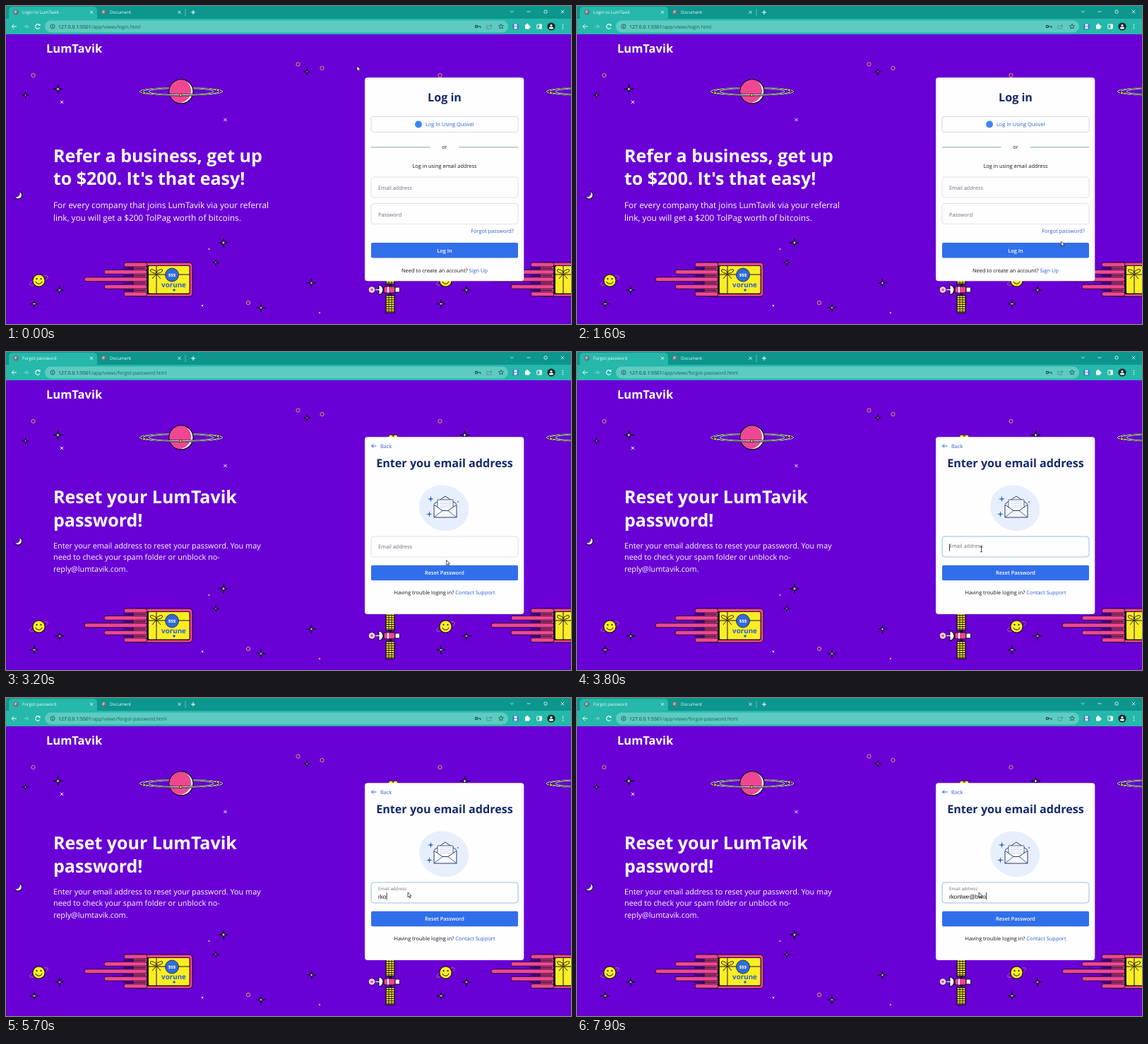
These frames come from a looping animation (800 by 450 pixels, 8000 ms). An HTML page with a canvas:

```html
<!DOCTYPE html>
<html lang="en">
<head>
<meta charset="utf-8">
<title>Login demo</title>
<style>
html, body { margin: 0; width: 100%; height: 100%; overflow: hidden; background: #6900d6; }
canvas, svg { position: absolute; left: 0; top: 0; width: 800px; height: 450px; }
text { font: 400 7.4px "Open Sans", "Noto Sans", sans-serif; fill: #15151c; white-space: pre; text-rendering: geometricPrecision; }
.bar { font-size: 6.2px; fill: #eefffc; }
.url { font-size: 6.9px; fill: #0d3f3b; }
.url tspan { fill: #16625b; }
.brand { font-size: 16.5px; font-weight: 700; fill: #fff; }
.big { font-size: 25px; font-weight: 700; fill: #fff; }
.lead { font-size: 11.85px; fill: #fff; }
.note { font-size: 10.83px; fill: #fff; }
.title { font-size: 16.15px; font-weight: 700; fill: #142a6c; }
.link { fill: #2f62d2; }
.hint { fill: #6d6d78; }
.btn { font-weight: 600; fill: #fff; }
.typed { font: 8.25px "Liberation Sans", Arial, sans-serif; }
.price { font-size: 6.2px; font-weight: 700; fill: #fff; }
.print { font-size: 9.8px; font-weight: 700; fill: #2c5fd0; }
.mid { text-anchor: middle; }
.end { text-anchor: end; }
</style>
</head>
<body>
<canvas id="scene" width="800" height="450"></canvas>
<svg viewBox="0 0 800 450">
  <text class="bar" id="tab" x="23" y="11"></text>
  <text class="bar" x="147" y="11">Document</text>
  <text class="url" x="74" y="31.5">127.0.0.1:5501<tspan id="path"></tspan></text>
  <text class="brand" x="57" y="66">LumTavik</text>
  <text class="price mid" x="235" y="382.6">$$$</text>
  <text class="print mid" x="237.5" y="398">vorune</text>

  <g id="login">
    <text class="big" x="67" y="221">Refer a business, get up</text>
    <text class="big" x="67" y="253">to $200. It's that easy!</text>
    <text class="lead" x="67" y="286">For every company that joins LumTavik via your referral</text>
    <text class="lead" x="67" y="304">link, you will get a $200 TolPag worth of bitcoins.</text>
    <text class="title mid" x="621" y="135">Log in</text>
    <text class="link" x="594" y="170.3">Log In Using Quovel</text>
    <text class="mid" x="621" y="202.2">or</text>
    <text class="mid" x="621" y="228.6">Log in using email address</text>
    <text class="hint" x="527" y="260">Email address</text>
    <text class="hint" x="527" y="297.5">Password</text>
    <text class="link end" x="719" y="320.5">Forgot password?</text>
    <text class="btn mid" x="621" y="348.6">Log In</text>
    <text class="mid" x="621" y="376.5">Need to create an account? <tspan class="link">Sign Up</tspan></text>
  </g>

  <g id="reset">
    <text class="big" x="67" y="214">Reset your LumTavik</text>
    <text class="big" x="67" y="246.5">password!</text>
    <text class="note" x="67" y="278">Enter your email address to reset your password. You may</text>
    <text class="note" x="67" y="294.3">need to check your spam folder or unblock no-</text>
    <text class="note" x="67" y="310.6">reply@lumtavik.com.</text>
    <text class="link" x="530" y="136">Back</text>
    <text class="title mid" x="621" y="163">Enter you email address</text>
    <text class="hint" id="label" x="527" y="278">Email address</text>
    <text class="typed" id="typed" x="527" y="283.5"></text>
    <rect id="caret" width="0.8" height="10" fill="#111"></rect>
    <text class="btn mid" x="621" y="315.3">Reset Password</text>
    <text class="mid" x="621" y="343">Having trouble loging in? <tspan class="link">Contact Support</tspan></text>
  </g>
</svg>
<canvas id="top" width="800" height="450"></canvas>
<script>
const LOOP = 8000, LOAD = 2100, READY = 2700, FOCUS = 3775, TILE = 576, TAU = 2 * Math.PI;
const PURPLE = '#6900d6', PINK = '#ef4792', YELLOW = '#fbee23', INK = '#140a20';
const BLUE = '#316fea', LINK = '#2f62d2', TEAL = '#25b8ab', PALE = '#effffc', DARK = '#14524d', PAPER = '#fefdff';
const el = id => document.getElementById(id);
const scene = el('scene').getContext('2d'), overlay = el('top').getContext('2d');
let c = scene;

const clamp = v => Math.max(0, Math.min(1, v));
const ease = v => v * v * (3 - 2 * v);

function paint(fill, stroke, w = 1) {
  if (fill) { c.fillStyle = fill; c.fill(); }
  if (stroke) { c.strokeStyle = stroke; c.lineWidth = w; c.stroke(); }
}
function box(x, y, w, h, r, fill, stroke, lw) {
  c.beginPath(); c.roundRect(x, y, w, h, r); paint(fill, stroke, lw);
}
function oval(x, y, rx, ry, fill, stroke, lw, rot = 0, a = 0, b = TAU) {
  c.beginPath(); c.ellipse(x, y, rx, ry, rot, a, b); paint(fill, stroke, lw);
}
const disc = (x, y, r, fill, stroke, lw) => oval(x, y, r, r, fill, stroke, lw);
function polar(x, y, radius, n, fill, stroke, lw) {
  c.beginPath();
  for (let i = 0; i < n; i++) {
    const a = i / n * TAU, r = radius(a, i);
    c.lineTo(x + r * Math.cos(a), y + r * Math.sin(a));
  }
  c.closePath();
  paint(fill, stroke, lw);
}
function line(col, lw, ...pts) {
  c.beginPath();
  for (let i = 0; i < pts.length; i += 2) c.lineTo(pts[i], pts[i + 1]);
  paint(null, col, lw);
}
function cross(x, y, r, col, lw) {
  line(col, lw, x - r, y - r, x + r, y + r);
  line(col, lw, x - r, y + r, x + r, y - r);
}
// dir is -1 for left, 1 for right
function arrow(x, y, w, h, dir, col) {
  line(col, 1, x - dir * w, y, x, y);
  line(col, 1, x - dir * h, y - h, x, y, x - dir * h, y + h);
}
// four-pointed star with sunken sides
const spark = (x, y, r, fill, stroke) =>
  polar(x, y, (a, i) => i % 2 ? r * 0.27 : r, 8, fill, stroke, 1.2);

function planet() {
  const x = 248, y = 121, rings = [59, 54, 46];
  const arcs = from => rings.forEach(r => {
    oval(x, y, r, r / 10, null, INK, 1.8, 0, from, from + Math.PI);
    oval(x, y, r, r / 10, null, '#f4e9ff', 0.9, 0, from, from + Math.PI);
  });
  arcs(Math.PI);
  disc(x, y, 17, '#fff', INK, 1.4);
  c.save();
  c.beginPath(); c.arc(x, y, 16.4, 0, TAU); c.clip();
  disc(x - 3, y - 1, 17, PINK);
  c.restore();
  arcs(0);
  for (const a of [2.7, 1.58, -0.45])
    disc(x + 58 * Math.cos(a), y + 5 * Math.sin(a), 1.8, YELLOW, INK, 0.8);
}

function gift() {
  box(180, 363, 84, 48, 5, PINK, INK, 1);
  for (let i = 0; i < 5; i++) {
    const x = 111 + 28 * Math.abs(i - 2), y = 363 + i * 10.4;
    box(x, y, 200 - x, 6, 3, PINK, INK, 0.9);
    if (i) line(INK, 1.2, 166, y - 2.2, 198, y - 2.2);
  }
  box(199, 367, 61.5, 41, 2, INK);
  box(201.5, 367.5, 58.5, 39.5, 2, YELLOW, INK, 0.9);
  line(INK, 1, 213, 368, 213, 407);
  line(INK, 1, 202, 380, 260, 380);
  for (const s of [-1, 1]) {
    oval(213 + s * 4.5, 375.5, 4.6, 2.1, YELLOW, INK, 0.9, -s * 0.45);
    line(INK, 0.9, 213, 379, 213 + s * 6, 386);
  }
  disc(235, 380.5, 9.5, '#2f6bdd', INK, 0.7);
  disc(238, 402, 1.8, '#2c5fd0');
}

function smiley() {
  const x = 46.5, y = 388.5, ring = from => oval(x, y, 14, 4, null, '#d9748a', 0.8, -0.42, from, from + 1.7);
  disc(x, y, 8.7, YELLOW, INK, 1.2);
  ring(-0.85); ring(Math.PI - 0.85);
  for (const s of [-3, 3]) disc(x + s, y - 2.5, 1.1, INK);
  oval(x, y + 0.5, 4.6, 4.2, null, INK, 1, 0, 0.2, 2.9);
}

function moon() {
  disc(17, 267.5, 5.6, '#fff', INK, 1.2);
  oval(14, 265, 6, 5.8, PURPLE);
}

function panel(x, y, w, h) {
  box(x, y, w, h, 0, YELLOW, INK, 1.3);
  for (let k = 3.2; k < h; k += 3.2) line(INK, 1, x, y + k, x + w, y + k);
  for (let k = 1; k < 3; k++) line(INK, 0.8, x + k * w / 3, y, x + k * w / 3, y + h);
}
function satellite() {
  const y = 401.5;
  for (const x of [545, 551.5]) disc(x, 120.5, 3.5, YELLOW, INK, 0.8);
  for (const dy of [-32, 8]) panel(538, y + dy, 12, 24.5);
  box(543, y - 8, 3, 16, 0, INK);
  box(535, y - 4.5, 16, 9, 2, PINK, INK, 1.2);
  box(551, y - 3.5, 6.5, 7, 1, '#fff', INK);
  box(540, y - 4, 2, 8, 0, '#fff');
  c.beginPath(); c.arc(527, y, 7, -1.45, 1.45); c.closePath(); paint('#fff', INK, 1.2);
  line('#fff', 1.2, 520, y, 529, y);
  disc(518, y, 4.8, '#f6d3ea', INK, 0.8);
  disc(518, y, 1.8, PINK);
}

function sky() {
  for (const [x, y] of [[38.5, 98], [413.5, 82.5], [447.5, 88], [343, 420]]) disc(x, y, 2.6, null, '#eda04a', 1);
  for (const [x, y] of [[287.5, 344], [444, 434]]) disc(x, y, 1.2, '#f0a23c');
  for (const [x, y] of [[73.5, 117.5], [308, 335], [426, 93], [297, 363], [27.5, 126]]) {
    const r = x === 73.5 || x === 308 ? 5.5 : 3.3;
    spark(x, y, r, INK, INK);
    spark(x, y, r * 0.55, '#fff');
  }
  for (const [x, y] of [[76, 402], [40, 421.5], [432.5, 392], [361, 427]]) spark(x, y, 4.8, '#fff', INK);
  for (const [x, y] of [[79, 136], [310.5, 161], [278, 424]]) cross(x, y, y > 400 ? 1.2 : 2.1, '#fff', 1);
}

function backdrop() {
  c.fillStyle = PURPLE;
  c.fillRect(0, 0, 800, 450);
  for (const dx of [0, TILE]) {
    c.save();
    c.translate(dx, 0);
    for (const draw of [sky, planet, gift, smiley, moon, satellite]) draw();
    c.restore();
  }
}

function tabs() {
  c.fillStyle = '#0c968d'; c.fillRect(0, 0, 800, 18);
  c.fillStyle = TEAL; c.fillRect(0, 18, 800, 22);
  box(4, 1, 125, 20, 5, TEAL);
  for (const x of [14, 138.5]) {
    disc(x, 8.8, 3.8, '#62787a');
    oval(x - 0.5, 8.2, 1.6, 2.2, '#aebcbc', null, 0, 0.5);
    cross(x + 107, 8.8, 2, PALE, 0.9);
  }
  line('#7cc9c2', 0.8, 254, 4, 254, 14);
  line(PALE, 1.1, 262, 9, 268, 9);
  line(PALE, 1.1, 265, 6, 265, 12);
  line(PALE, 0.8, 714, 6.8, 716.3, 9, 718.6, 6.8);
  line(PALE, 0.8, 737.5, 8, 742.5, 8);
  box(762, 6, 4, 4, 1, null, PALE, 0.8);
  cross(788, 8, 2.2, PALE, 0.9);
}

function toolbar(loading) {
  const y = 29;
  box(55, 20.5, 656, 17, 8.5, '#5dcbc1');
  arrow(8.2, y, 6.8, 3.2, -1, PALE);
  arrow(31.5, y, 6.5, 3, 1, '#86d8d0');
  oval(45, y, 3.2, 3.2, null, PALE, 1.1, 0, 0.5, 5.6);
  box(46.2, 25.6, 2.4, 2.4, 0, PALE);
  disc(66, y, 3.1, null, DARK, 0.8);
  line(DARK, 0.9, 66, 27.2, 66, 31);

  disc(666, y, 1.7, null, DARK, 1.2);
  line(DARK, 1.2, 667.8, y, 671.8, y, 671.8, 31);
  line('#4b8f89', 0.8, 682, 27, 681, 27, 681, 32, 687, 32, 687, 31);
  arrow(688, 28, 5, 2, 1, '#4b8f89');
  c.save();
  c.translate(701, y); c.rotate(-TAU / 4);
  polar(0, 0, (a, i) => i % 2 ? 1.6 : 3.7, 10, null, DARK, 0.8);
  c.restore();

  box(717.5, 25, 8, 8, 1, loading ? '#d9efed' : '#3f6fc4');
  for (const dy of [0.5, 4.3]) box(719.3, 25 + dy, 4.4, 3, 0, '#e8eef8');
  box(735, 26.5, 6, 6, 0.6, '#fff');
  disc(738, 26, 1.3, '#fff'); disc(741.2, 29.5, 1.3, '#fff');
  box(751.8, 26, 6.6, 6, 0.6, null, '#fff');
  box(755.3, 26, 3.2, 6, 0, '#fff');
  disc(772, y, 5.6, '#15272b');
  disc(772, 27.5, 1.6, '#fff');
  box(769, 29.8, 6, 2.6, 1.3, '#fff');
  for (const dy of [-2.8, 0, 2.8]) disc(788.5, y + dy, 0.8, '#fff');
}

const card = (y, h) => box(508, y, 225.3, h, 4, PAPER);
const field = (y, stroke = '#dfe1ea') => box(517, y, 208, 29, 4, PAPER, stroke, 1);
const button = (y, fill) => box(517, y, 208, 21.4, 2, fill);

function loginCard() {
  card(101.3, 288);
  box(517, 156.5, 208, 22, 3, PAPER, '#d6d9e4');
  disc(584, 167.5, 5, '#4285f4');
  for (const x of [517, 641.5]) box(x, 198.9, 83.5, 1.7, 0, '#a9c3cb');
  field(242);
  field(279.6);
  button(335, BLUE);
}

function letter() {
  const ink = '#283a70', x = 622, y = 219;
  polar(621, 218, a => 33.5 + 3 * Math.cos(a - 1.92) + 1.8 * Math.cos(2 * a - 0.7), 60, '#e7effc');
  line(ink, 1, x - 16, y - 4, x, y - 15, x + 16, y - 4);
  box(x - 11, y - 10, 22, 20, 0.5, '#fff', ink, 0.8);
  for (let k = -7; k < 1; k += 2.5) line('#c3cbe0', 0.8, x - 8, y + k, x + 8, y + k);
  c.beginPath();
  for (const [dx, dy] of [[-16, -3], [-4, 5.5], [4, 5.5], [16, -3], [16, 15], [-16, 15]]) c.lineTo(x + dx, y + dy);
  c.closePath();
  paint('#f8f9fe', ink, 1);
  for (const s of [-1, 1]) line(ink, 0.8, x + s * 16, y + 15, x + s * 4, y + 5.5);
  spark(601.5, 208, 2, '#3566d6', '#3566d6');
  spark(599.5, 229.5, 2, '#3566d6', '#3566d6');
  disc(640, 212, 0.9, '#3566d6');
}

function resetCard(t, hover) {
  card(120.3, 250.6);
  arrow(517.5, 133, 7, 2.7, -1, LINK);
  letter();
  field(261, t < FOCUS ? undefined : '#92c6dc');
  button(301.8, hover ? '#3558d4' : BLUE);
}

// each glide eases the pointer on by (dx, dy)
const glides = [[200, 1500, 188.5, 248], [1650, 1900, 1, -14.5], [2800, 3550, -114, -43.5], [3850, 4200, -3.5, 0]];
function pointer(t) {
  let x = 497, y = 85;
  for (const [from, to, dx, dy] of glides) {
    const k = ease(clamp((t - from) / (to - from)));
    x += dx * k;
    y += dy * k;
  }
  return [x, y];
}
function pointerKind(t, x, y) {
  const within = (top, bottom, left = 517) => x > left && x < 725 && y > top && y < bottom;
  if (t < LOAD) {
    if (within(313, 324, 657)) return 'hand';
    return within(242, 271) || within(280, 309) ? 'beam' : 'arrow';
  }
  if (within(302, 323)) return 'hand';
  return t < FOCUS + 120 && within(261, 290) ? 'beam' : 'arrow';
}
const outlines = {
  arrow: 'M0 0V7L1.6 5.6 2.7 8 3.9 7.5 2.8 5.1 4.8 5Z',
  beam: 'M-1.6 .3H1.6M0 .3V7.7M-1.6 7.7H1.6',
  hand: 'M-.7 0H.6L.8 3 4.5 4.5 3.5 9.3H-.2L-2.8 6-2 5.3-.8 6.2Z'
};
function drawPointer(kind, x, y) {
  c.save();
  c.translate(x, y);
  const path = new Path2D(outlines[kind]);
  c.fillStyle = '#fff'; c.strokeStyle = '#1a1a1a'; c.lineWidth = 0.75;
  c.fill(path); c.stroke(path);
  c.restore();
}

// steady typing with one slip, then the correction; '<' is backspace
const burst = (start, step, chars) => [...chars].map((key, i) => [start + i * step, key]);
const keys = [...burst(5350, 150, 'rkonlwe0'), ...burst(6800, 260, '<@bwo')];

function showForm(t) {
  let text = '', last = FOCUS;
  for (const [at, key] of keys) {
    if (at > t) break;
    text = key === '<' ? text.slice(0, -1) : text + key;
    last = at;
  }
  const up = ease(clamp((t - FOCUS) / 150));
  el('label').setAttribute('y', 278 - 6.4 * up);
  el('label').style.fontSize = 7.4 - 1.2 * up + 'px';
  el('typed').textContent = text;
  const caret = el('caret');
  caret.setAttribute('x', 527.2 + (text ? el('typed').getComputedTextLength() : 0));
  caret.setAttribute('y', 271.5 + 4 * up);
  caret.style.display = t >= FOCUS && (t - last) % 1060 < 530 ? '' : 'none';
}

function frame(t) {
  const login = t < LOAD, [x, y] = pointer(t), kind = pointerKind(t, x, y);
  c = scene;
  backdrop();
  tabs();
  toolbar(!login && t < READY);
  if (login) loginCard();
  else resetCard(t, kind === 'hand');

  el('tab').textContent = login ? 'Login to LumTavik' : 'Forgot password';
  el('path').textContent = `/app/views/${login ? 'login' : 'forgot-password'}.html`;
  el('login').style.display = login ? '' : 'none';
  el('reset').style.display = login ? 'none' : '';
  if (!login) showForm(t);

  c = overlay;
  c.clearRect(0, 0, 800, 450);
  drawPointer(kind, x, y);
}

const start = performance.now();
function tick() {
  frame((performance.now() - start) % LOOP);
  requestAnimationFrame(tick);
}
tick();
</script>
</body>
</html>
```
